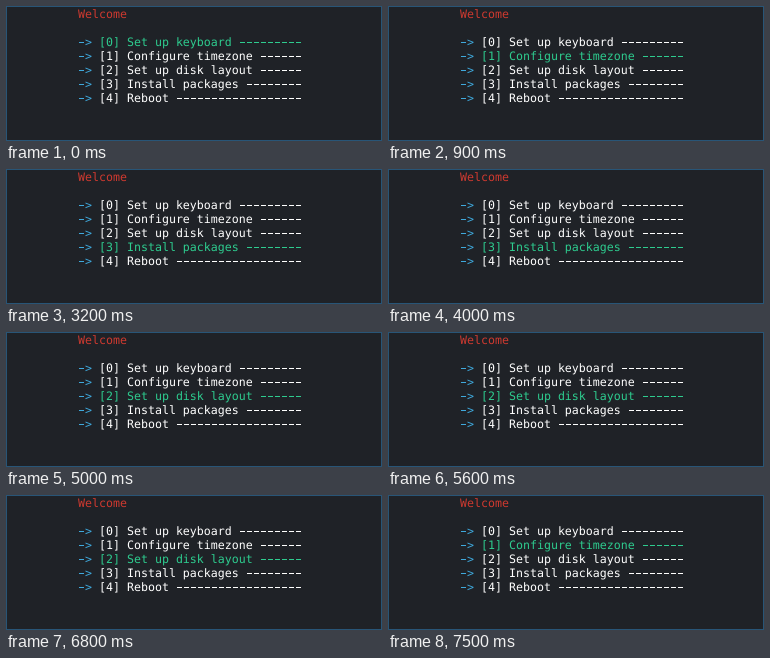
Write an HTML page that moves like this. It is 376 by 135 pixels and loops after 8 s.

```html
<!DOCTYPE html>
<html lang="en">
<head>
<meta charset="utf-8">
<title>Setup menu</title>
<style>
  html, body { margin: 0; width: 100%; height: 100%; overflow: hidden; background: #1f2227; }
  svg { display: block; width: 100%; height: 100%; }
  text {
    font: 11.628px "DejaVu Sans Mono", "Liberation Mono", monospace;
    white-space: pre;
    text-rendering: geometricPrecision;
  }
  .frame { fill: #1f2227; stroke: #285577; }
  .title { fill: #cf3a30; }
  .arrow { fill: #3fa9dc; }
  .shaft { stroke: #3fa9dc; }
  .item { fill: #fff; }
  .rule { stroke: #fff; stroke-dasharray: 5 2; }
  .on .item { fill: #2ecc8f; }
  .on .rule { stroke: #2ecc8f; }
</style>
</head>
<body>
<svg id="stage" viewBox="0 0 376 135">
  <rect class="frame" x=".5" y=".5" width="375" height="134"/>
</svg>
<script>
const LOOP = 8000, REPEAT = 100;
const CELL = 7, LINE = 14, LEFT = 72, TOP = 12, COLUMNS = 32;
const labels = ["Set up keyboard", "Configure timezone", "Set up disk layout", "Install packages", "Reboot"];

// Arrow key presses: [start in ms, rows moved]; a held key repeats.
const presses = [
  [900, 1], [1100, 1], [1500, -2], [2500, -1], [3200, -1], [3700, 1], [4000, -1],
  [4400, -2], [5000, 5], [5600, 3], [6000, 1], [6600, 1], [6800, 2], [7200, -1], [7500, -1]
];

const stage = document.getElementById("stage");
const column = n => LEFT + n * CELL;

function add(parent, tag, attrs, content = "") {
  const node = document.createElementNS("http://www.w3.org/2000/svg", tag);
  for (const name in attrs) node.setAttribute(name, attrs[name]);
  node.textContent = content;
  return parent.appendChild(node);
}

function write(parent, kind, col, y, content) {
  add(parent, "text", { class: kind, x: column(col), y }, content);
}

function dash(parent, kind, from, to, y) {
  add(parent, "line", { class: kind, x1: column(from) + 1, x2: column(to) - 1, y1: y, y2: y });
}

write(stage, "title", 0, TOP, "Welcome");

const rows = labels.map((label, i) => {
  const row = add(stage, "g", {});
  const y = TOP + (i + 2) * LINE;
  dash(row, "shaft", 0, 1, y - 3.5);
  write(row, "arrow", 1, y, ">");
  write(row, "item", 3, y, `[${i}] ${label}`);
  dash(row, "rule", 8 + label.length, COLUMNS, y - 3.5);
  return row;
});

function stepsDone(t, [start, steps]) {
  const repeats = Math.floor((t - start) / REPEAT) + 1;
  return Math.sign(steps) * Math.max(0, Math.min(Math.abs(steps), repeats));
}

function draw(time) {
  const t = time % LOOP, count = rows.length;
  const moved = presses.reduce((sum, press) => sum + stepsDone(t, press), 0);
  const selected = (moved % count + count) % count;
  rows.forEach((row, i) => row.classList.toggle("on", i === selected));
}

function tick(now) {
  draw(now);
  requestAnimationFrame(tick);
}

draw(0);
requestAnimationFrame(tick);
</script>
</body>
</html>
```
